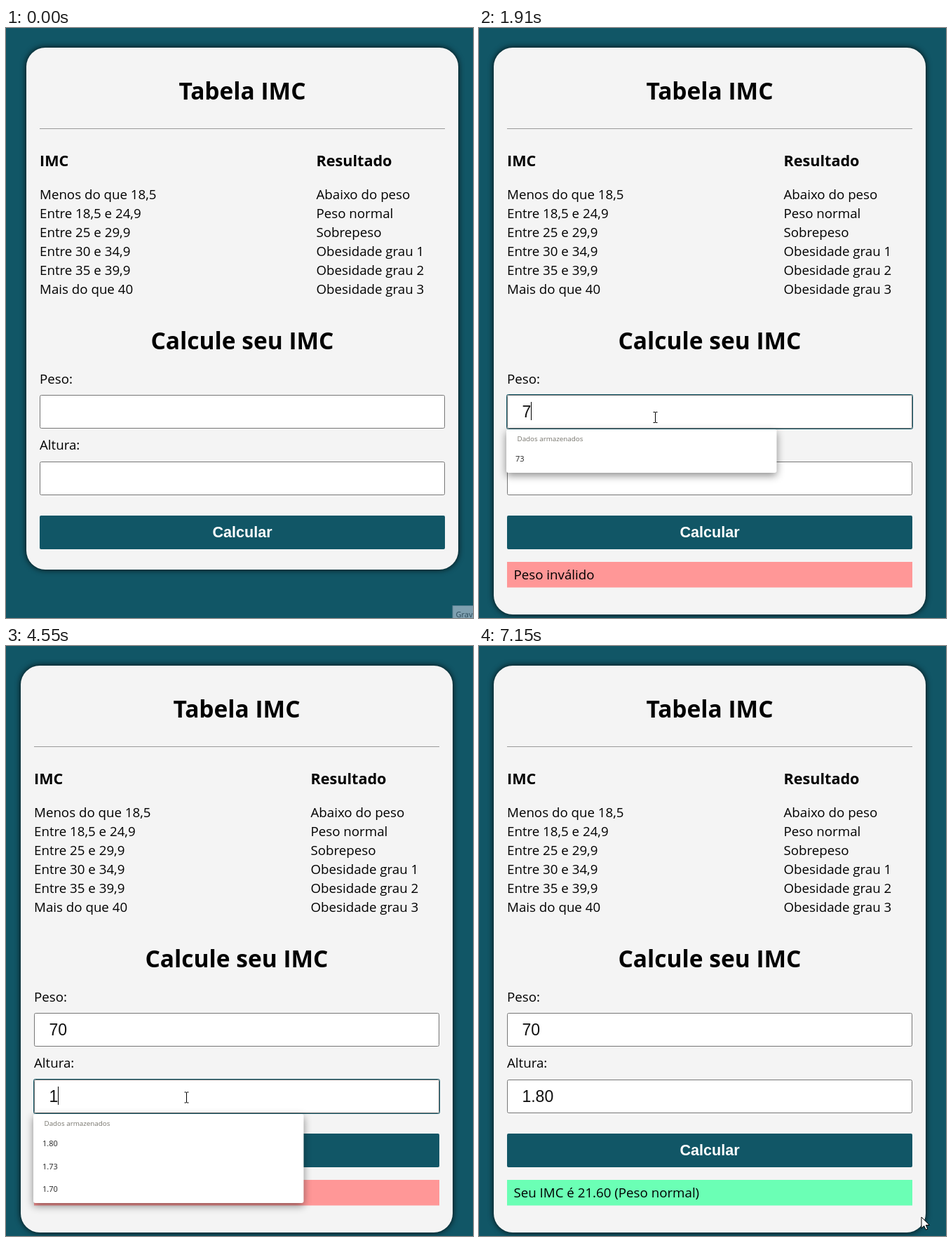
An HTML page that plays this animation: 666 px wide and 841 px high, repeating every 7.2 s.

```html
<!DOCTYPE html>
<html lang="pt">
<head>
<meta charset="utf-8">
<title>Tabela IMC</title>
<style>
html, body { margin: 0; width: 100%; height: 100%; overflow: hidden; background: #115666; }
svg { display: block; width: 666px; height: 841px; }
text { font: 400 18.72px "Open Sans", sans-serif; white-space: pre; }
.h1 { font-weight: 700; font-size: 33.5px; text-anchor: middle; }
.h3 { font-weight: 700; font-size: 21.6px; }
.value { font: 23.04px "Liberation Sans", Arial, sans-serif; fill: #111; }
.btn { font: 700 21.6px "Liberation Sans", Arial, sans-serif; fill: #fff; text-anchor: middle; }
.small { font-size: 9.8px; fill: #75736b; }
.item { font-size: 11px; fill: #222; }
.field { fill: #fff; stroke: #767676; }
.ring { fill: none; stroke: #115666; }
#card { fill: #f4f4f4; filter: drop-shadow(0 0 4px rgba(0, 0, 0, .9)); }
#list rect { fill: #fff; filter: drop-shadow(0 4px 6px rgba(0, 0, 0, .45)); }
#cursor path { fill: #fff; stroke: #000; stroke-linejoin: round; }
</style>
</head>
<body>
<svg viewBox="0 0 666 841">
  <rect width="666" height="841" fill="#115666"/>
  <g id="page">
    <rect id="card" x="21" y="28" width="616" height="744" rx="27"/>
    <text class="h1" x="329" y="101.5">Tabela IMC</text>
    <rect x="40" y="143" width="578" height="1" fill="#9a9a9a"/>
    <text class="h3" x="40" y="197">IMC</text>
    <text class="h3" x="434.5" y="197">Resultado</text>
    <g id="rows"></g>
    <text class="h1" x="329" y="458">Calcule seu IMC</text>
    <text x="40" y="507">Peso:</text>
    <text x="40" y="601">Altura:</text>
    <g id="fields"></g>
    <rect id="button" x="40" y="695" width="578" height="48" rx="2"/>
    <text class="btn" x="329" y="725.5">Calcular</text>
    <g id="result">
      <rect id="bar" x="40" y="761" width="578" height="36.5"/>
      <text id="message" x="49.5" y="786"></text>
    </g>
    <g id="list">
      <rect x="39" width="385.5" rx="3"/>
      <text class="small" x="54.5" y="16.5">Dados armazenados</text>
      <g id="items"></g>
    </g>
  </g>
  <g id="tip">
    <rect x="637" y="823.5" width="40" height="30" fill="#7fa0b0" stroke="#5d8294"/>
    <text class="item" x="641.5" y="840" style="fill:#2b4a5a">Gravar</text>
  </g>
  <g id="cursor">
    <path id="hand" transform="translate(-5.2)" d="M3.5 13V2a1.7 1.7 0 0 1 3.4 0v6.2c.2-1.5 3-1.3 3 .6 .3-1.2 2.7-.9 2.7 .8 .4-1 2.4-.5 2.4 1.2v5c0 2-1.5 3-1.5 5v2.2h-7v-2C5.5 18.5 2 15.5 .9 13c-.8-1.7 1.3-2.7 2.6-.8z"/>
    <path id="beam" style="fill:none" d="M-3-7.5h2.5l.5.5 .5-.5H3M0-7V7M-3 7.5h2.5l.5-.5 .5.5H3"/>
    <path id="arrow" d="M0 0v16l3.7-3.5 2.5 5.6 2.6-1.1-2.5-5.5h5z"/>
  </g>
</svg>
<script>
const $ = id => document.getElementById(id);
const show = (el, on) => el.style.display = on ? '' : 'none';
const set = (el, attrs) => { for (const k in attrs) el.setAttribute(k, attrs[k]); };
// Last entry whose time has passed
const at = (steps, t) => steps.reduce((a, s) => s[0] <= t ? s : a, steps[0]);

const rows = [
  ['Menos do que 18,5', 'Abaixo do peso'], ['Entre 18,5 e 24,9', 'Peso normal'],
  ['Entre 25 e 29,9', 'Sobrepeso'], ['Entre 30 e 34,9', 'Obesidade grau 1'],
  ['Entre 35 e 39,9', 'Obesidade grau 2'], ['Mais do que 40', 'Obesidade grau 3']
];
$('rows').innerHTML = rows.map(([a, b], i) =>
  `<text x="40" y="${244 + 27 * i}">${a}</text><text x="434.5" y="${244 + 27 * i}">${b}</text>`).join('');

const fields = [
  { y: 523, focus: [1780, 2820],
    typed: [[0, ''], [1780, ''], [1890, '7'], [2060, '70']],
    lists: [[0, []], [1890, ['73']], [2060, []]] },
  { y: 618, focus: [3650, 6270],
    typed: [[0, ''], [3650, ''], [4550, '1'], [4760, '1.'], [4810, '1.8'], [5020, '1.80']],
    lists: [[0, []], [3690, ['1.80', '1.73', '1.70']], [4860, ['1.80']], [5020, []]] }
];
$('fields').innerHTML = fields.map(({ y }) => `<g>
  <rect class="field" x="40.5" y="${y + .5}" width="577" height="47" rx="2"/>
  <rect class="ring" x="39.5" y="${y - .5}" width="579" height="49" rx="2"/>
  <text class="value" x="61.4" y="${y + 32}"></text>
  <rect y="${y + 10}" width="1" height="26"/></g>`).join('');
fields.forEach((f, i) => [, f.ring, f.text, f.caret] = $('fields').children[i].children);

const path = [
  [30, 660, 832], [730, 415.5, 730], [860, 415.5, 730], [1480, 251.5, 555],
  [2080, 251.5, 555], [2600, 312, 712], [3280, 312, 712], [3560, 257.5, 643.5],
  [5550, 257.5, 643.5], [5820, 329, 707], [6630, 329, 707], [7150, 631, 814]
];
const results = [[800, '#ff9797', 'Peso inválido'], [3080, '#ff9797', 'Altura inválida'],
  [6370, '#6bffb5', 'Seu IMC é 21.60 (Peso normal)']];

function position(t) {
  const i = path.findIndex(p => p[0] > t);
  if (i < 0) return path[path.length - 1].slice(1);
  if (i === 0) return path[0].slice(1);
  const [t0, x0, y0] = path[i - 1], [t1, x1, y1] = path[i];
  const u = (t - t0) / (t1 - t0), e = u * u * (3 - 2 * u);
  return [x0 + (x1 - x0) * e, y0 + (y1 - y0) * e];
}

function drawField(f, t) {
  const [since, value] = at(f.typed, t);
  const focused = t >= f.focus[0] && t < f.focus[1];
  f.text.textContent = value;
  show(f.ring, focused);
  show(f.caret, focused && (t - since) % 1020 < 510);
  const width = value ? f.text.getComputedTextLength() : 0;
  set(f.caret, { x: Math.floor(62 + width) });
}

function drawList(t) {
  const f = fields.find(f => at(f.lists, t)[1].length);
  show($('list'), f);
  if (!f) return;
  const items = at(f.lists, t)[1];
  set($('list'), { transform: `translate(0 ${f.y + 49})` });
  set($('list').firstElementChild, { height: 62 + 32.5 * (items.length - 1) });
  $('items').innerHTML = items.map((s, i) =>
    `<text class="item" x="52" y="${46 + 32.5 * i}">${s}</text>`).join('');
}

function draw(t) {
  const done = t >= 800, dx = done ? 0 : 8;
  set($('page'), { transform: `translate(${dx} 0)` });
  set($('card'), { height: done ? 808 : 744 });
  show($('result'), done);
  const [, color, message] = at(results, t);
  set($('bar'), { fill: color });
  $('message').textContent = message;
  fields.forEach(f => drawField(f, t));
  drawList(t);

  const [x, y] = position(t);
  const inside = top => x > 40 + dx && x < 618 + dx && y > top && y < top + 48;
  const kind = inside(695) ? 'hand' : fields.some(f => inside(f.y)) ? 'beam' : 'arrow';
  for (const k of ['hand', 'beam', 'arrow']) show($(k), k === kind);
  set($('cursor'), { transform: `translate(${x} ${y})` });
  show($('cursor'), t >= 30);
  set($('button'), { fill: kind === 'hand' ? '#092f38' : '#115666' });
  show($('tip'), t < 30);
}

function tick() {
  draw(performance.now() % 7200);
  requestAnimationFrame(tick);
}
tick();
</script>
</body>
</html>
```
